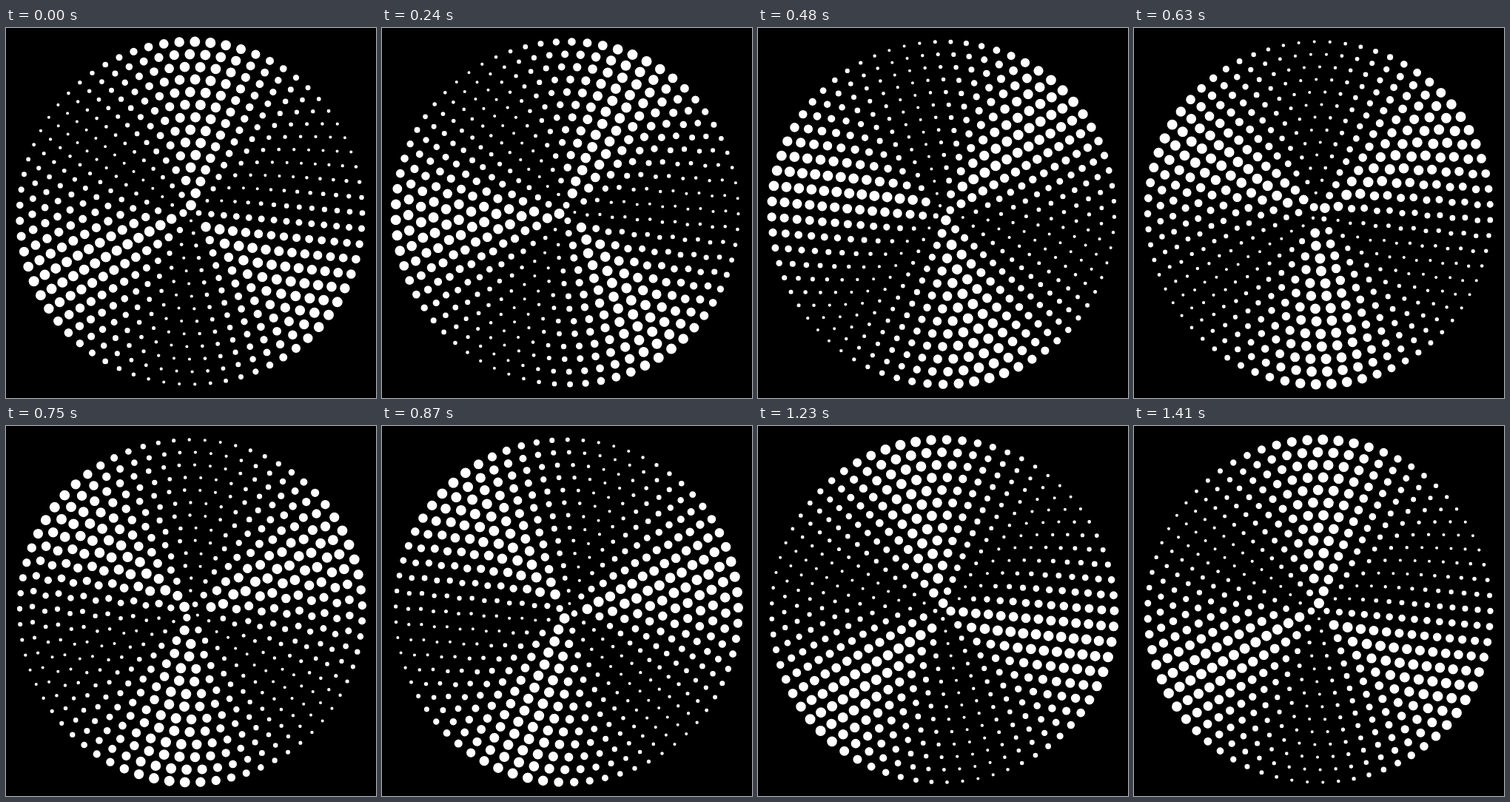
Animation, 500 px wide and 500 px high, one loop 1.44 s. Source, as an HTML page with a canvas:

```html
<!DOCTYPE html>
<html lang="en">
<head>
<meta charset="utf-8">
<title>Counter-rotating dot rings</title>
<style>
  html, body { margin: 0; width: 100%; height: 100%; overflow: hidden; background: #000; }
  canvas { display: block; width: 500px; height: 500px; }
</style>
</head>
<body>
<canvas id="stage" width="500" height="500"></canvas>
<script>
const ctx = document.getElementById('stage').getContext('2d');
const TAU = Math.PI * 2;
const LOOP = 1440, STEP = 30, LEAD = 60;
const RINGS = 14, CENTER = 250;

// Symmetric ease in and out.
const POWER = 2.5;
const ease = x => x < 0.5
  ? 0.5 * (2 * x) ** POWER
  : 1 - 0.5 * (2 - 2 * x) ** POWER;

// Three bright arms sweep clockwise across the dots.
const dotRadius = (angle, phase) =>
  4.5 + 2.5 * Math.cos(3 * (angle + TAU / 4) - TAU * phase);

function draw(ms) {
  const phase = (ms + LEAD) % LOOP / LOOP;
  const turn = ease(phase);

  ctx.fillStyle = '#000';
  ctx.fillRect(0, 0, 500, 500);
  ctx.fillStyle = '#fff';
  ctx.beginPath();

  for (let ring = 0; ring < RINGS; ring++) {
    const count = 4 + 5 * ring;
    const radius = 10.5 + 17 * ring;
    // Neighbouring rings advance one dot in opposite directions.
    const shift = ring / (RINGS - 1) + (ring % 2 ? turn : -turn);

    for (let i = 0; i < count; i++) {
      const angle = TAU * (i + shift) / count;
      const x = CENTER + radius * Math.cos(angle);
      const y = CENTER + radius * Math.sin(angle);
      const r = dotRadius(angle, phase);
      ctx.moveTo(x + r, y);
      ctx.arc(x, y, r, 0, TAU);
    }
  }
  ctx.fill();
}

const start = performance.now();

function tick() {
  const ms = (performance.now() - start) % LOOP;
  draw(Math.floor(ms / STEP) * STEP);
  requestAnimationFrame(tick);
}

tick();
</script>
</body>
</html>
```
